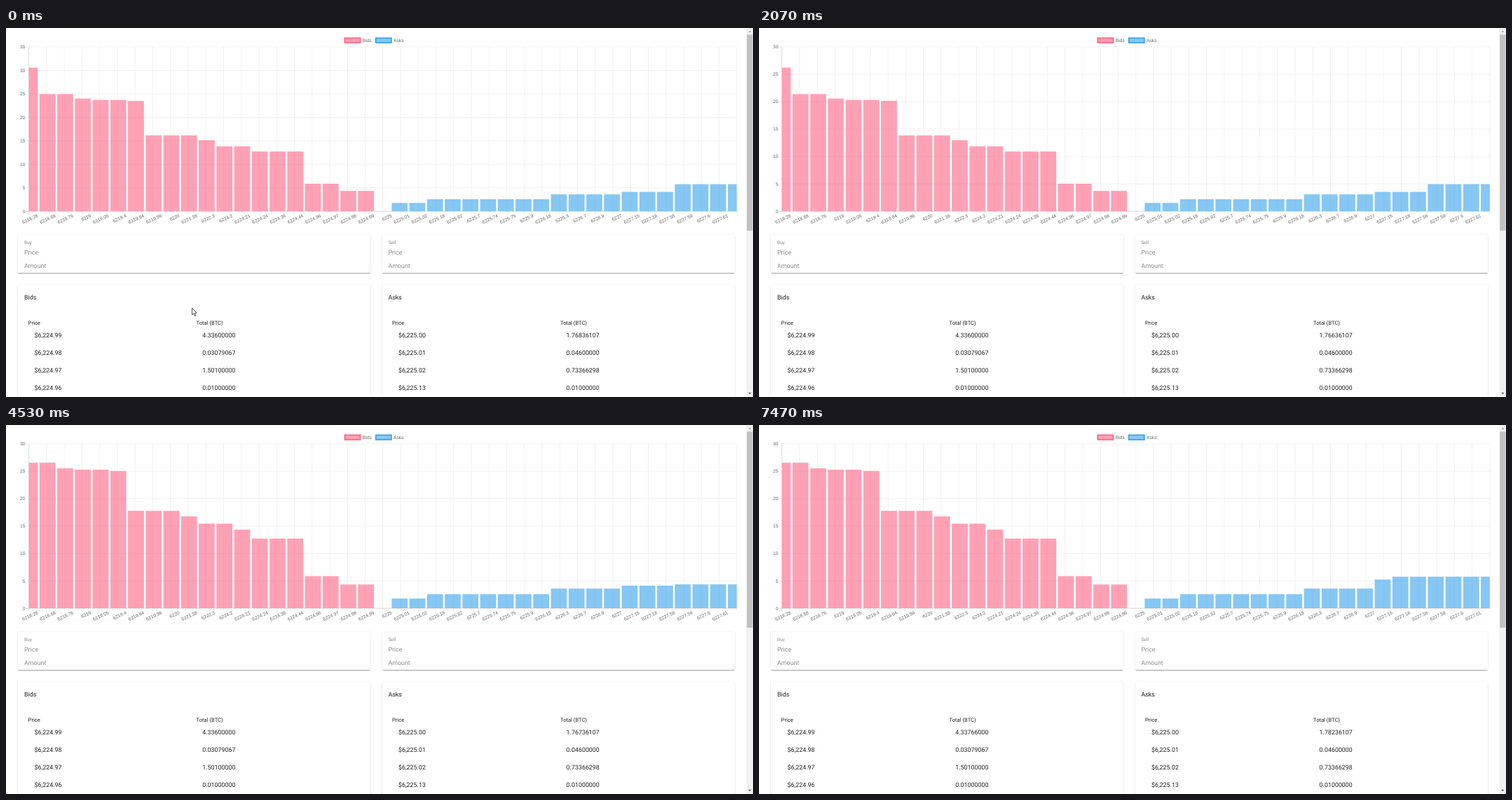
An HTML page with a canvas for the animation above (8000 ms loop, 1066x526 px).

```html
<!DOCTYPE html>
<html lang="en">
<head>
<meta charset="utf-8">
<title>Order book</title>
<style>
  html, body { margin: 0; width: 100%; height: 100%; overflow: hidden; background: #fff; }
  canvas { position: absolute; left: 0; top: 0; }
  .card {
    position: absolute; width: 503px; border-radius: 1px; background: #fff;
    box-shadow: 0 1.7px .6px -1.1px rgba(0,0,0,.2), 0 1.1px 1.1px rgba(0,0,0,.14), 0 .6px 2.8px rgba(0,0,0,.12);
  }
  .left { left: 17px; }
  .right { left: 536.5px; }
  .form { top: 294.5px; height: 54.5px; }
  .table { top: 365.5px; bottom: 0; }
</style>
</head>
<body>
<div class="card left form"></div>
<div class="card right form"></div>
<div class="card left table"></div>
<div class="card right table"></div>
<canvas id="stage" width="1066" height="526"></canvas>
<script>
const ctx = document.getElementById('stage').getContext('2d');
ctx.textRendering = 'geometricPrecision';

const LOOP = 8000, FPS = 15, DURATION = 1000;
const LEFT = 32.7, RIGHT = 1042.8, TOP = 26.9, BASE = 261.3;
const SLOTS = 20, STEP = (RIGHT - LEFT) / (2 * SLOTS), BAR = STEP * 0.9;
const CHART_FONT = '6.67px "Liberation Sans", Arial, sans-serif';
const INK = 'rgba(0,0,0,.87)', MUTED = 'rgba(0,0,0,.45)';
const PINK = [255, 99, 132], BLUE = [54, 162, 235];

// A label that begins with a point shares the whole part of the one before it.
let whole = '';
const labels = ('6218.28 .68 .76 6219 .05 .4 .94 .99 6220 6221.38 6222.3 6224.2 .21 .24 .39 .44 .96 .97 .98 .99 ' +
  '6225 .01 .02 .18 .62 .7 .74 .75 .9 6226.18 .3 .7 .9 6227 .15 .18 .58 .59 .6 .61').split(' ').map(label => {
  if (label[0] === '.') return whole + label;
  whole = label.split('.')[0];
  return label;
});

// Market depth as a staircase of [slot from the spread, total].
const depth = (...steps) => Array.from({ length: SLOTS }, (_, slot) => steps.findLast(([from]) => from <= slot)[1]);
const bids = (...far) => depth([0, 4.35], [2, 5.87], [4, 12.73], ...far);
const asks = (...far) => depth([0, 1.79], [2, 2.57], [9, 3.6], ...far);

const bidsBefore = bids([7, 13.84], [9, 15.13], [10, 16.15], [13, 23.5], [14, 23.7], [16, 24], [17, 24.95], [19, 30.58]);
const bidsAfter = bids([7, 14.35], [8, 15.45], [10, 16.77], [11, 17.79], [14, 25.05], [15, 25.3], [17, 25.55], [18, 26.57]);
const asksHigh = asks([13, 4.14], [16, 5.77]);
const asksLow = asks([13, 4.14], [16, 4.16]);
const asksWide = asks([13, 5.24], [14, 5.77]);

// Each update eases the bar heights from the previous one; the scale changes at once.
const updates = [
  { at: -2000, max: 35, bids: bidsBefore, asks: asksHigh },
  { at: 130, max: 35, bids: bidsBefore, asks: asksLow },
  { at: 1150, max: 35, bids: bidsBefore, asks: asksHigh },
  { at: 2149, scaleAt: 2060, max: 30, bids: bidsAfter, asks: asksHigh },
  { at: 4136, max: 30, bids: bidsAfter, asks: asksLow },
  { at: 5180, max: 30, bids: bidsAfter, asks: asksWide },
];
const bidTotals = [[0, '4.33600000'], [5190, '4.33700000'], [6190, '4.33600000'], [7190, '4.33766000']];
const askTotals = [[0, '1.76836107'], [1190, '1.76736107'], [2060, '1.76636107'], [3190, '1.76736107'], [6190, '1.78236107']];

const rgba = (color, alpha) => `rgba(${color},${alpha})`;
const easeOut = p => 1 - (1 - p) ** 4;
const clamp = p => Math.min(1, Math.max(0, p));
const current = (list, t) => list.findLast(([at]) => at <= t)[1];

function text(str, x, y, size, color = INK) {
  ctx.font = `${size}px Roboto, sans-serif`;
  ctx.fillStyle = color;
  ctx.fillText(str, x, y);
}

function line(x1, y1, x2, y2, alpha) {
  ctx.strokeStyle = `rgba(0,0,0,${alpha})`;
  ctx.lineWidth = 0.6;
  ctx.beginPath();
  ctx.moveTo(x1, y1);
  ctx.lineTo(x2, y2);
  ctx.stroke();
}

function box(x, y, width, height, fill) {
  ctx.fillStyle = fill;
  ctx.fillRect(x, y, width, height);
}

function shape(points, fill) {
  ctx.beginPath();
  points.forEach(([x, y]) => ctx.lineTo(x, y));
  ctx.closePath();
  ctx.fillStyle = fill;
  ctx.fill();
}

function legend(label, x, color) {
  box(x, 14.3, 22.2, 6.67, rgba(color, 0.6));
  ctx.strokeStyle = rgba(color, 1);
  ctx.lineWidth = 1.67;
  ctx.strokeRect(x, 14.3, 22.2, 6.67);
  ctx.font = CHART_FONT;
  ctx.fillStyle = '#666';
  ctx.fillText(label, x + 25.4, 19.9);
}

function axes(max) {
  ctx.save();
  ctx.font = CHART_FONT;
  ctx.fillStyle = '#666';
  ctx.textAlign = 'right';
  for (let value = 0; value <= max; value += 5) {
    const y = BASE - (BASE - TOP) * value / max;
    line(LEFT - 5.5, y, RIGHT, y, value ? 0.1 : 0.25);
    ctx.fillText(value, 27.4, y + 2.3);
  }
  for (let i = 0; i <= labels.length; i++) {
    const x = LEFT + i * STEP;
    line(x, TOP, x, BASE + 5.5, i ? 0.1 : 0.25);
  }
  ctx.textBaseline = 'middle';
  labels.forEach((label, i) => {
    ctx.save();
    ctx.translate(LEFT + (i + 0.5) * STEP, 267.4);
    ctx.rotate(-25 * Math.PI / 180);
    ctx.fillText(label, 0, 0);
    ctx.restore();
  });
  ctx.restore();
}

function bars(t) {
  const index = updates.findLastIndex(u => u.at <= t);
  const to = updates[index], from = updates[Math.max(0, index - 1)];
  const p = easeOut(clamp((t - to.at) / DURATION));
  const draw = (side, color, slotX) => to[side].forEach((total, slot) => {
    const start = from[side][slot] / from.max, end = total / to.max;
    const height = (start + (end - start) * p) * (BASE - TOP);
    box(slotX(slot), BASE - height, BAR, height, rgba(color, 0.6));
  });
  ctx.save();
  ctx.beginPath();
  ctx.rect(LEFT, TOP, RIGHT - LEFT, BASE - TOP);
  ctx.clip();
  draw('bids', PINK, slot => LEFT + (SLOTS - 0.5 - slot) * STEP - BAR);
  draw('asks', BLUE, slot => LEFT + (SLOTS + 0.5 + slot) * STEP);
  ctx.restore();
}

function panel(x, form, title, rows) {
  text(form, x, 308.2, 6.67, MUTED);
  text('Price', x, 322.9, 8.89, MUTED);
  text('Amount', x, 342.2, 8.89, MUTED);
  text(title, x, 386.7, 8.89);
  text('Price', x + 5.6, 422.7, 7.6);
  text('Total (BTC)', x + 245.6, 422.7, 7.6);
  rows.forEach(([price, total], i) => {
    const y = 441 + i * 25;
    text(price, x + 14.5, y, 8.89);
    text(total, x + 254.2, y, 8.89);
  });
}

function scrollbar() {
  box(1056.6, 0, 9.4, 526, '#f1f1f1');
  box(1057.2, 9.4, 8.2, 279.5, '#c1c1c1');
  shape([[1059.3, 6], [1061.4, 3.8], [1063.5, 6]], '#a3a3a3');
  shape([[1059.3, 519.8], [1061.4, 522], [1063.5, 519.8]], '#505050');
}

function cursor(t) {
  const p = clamp((t - 10) / 390);
  if (p === 1) return;
  ctx.save();
  ctx.translate(265.6 - 213 * p, 399.4 + 126 * p);
  shape([[0, 0], [0, 9.4], [2.1, 7.5], [3.7, 11], [5.2, 10.3], [3.7, 7], [6.5, 6.7]], '#fff');
  ctx.strokeStyle = '#000';
  ctx.lineWidth = 0.7;
  ctx.stroke();
  ctx.restore();
}

function draw(now) {
  const t = Math.floor((now % LOOP) * FPS / 1000 + 0.1) * 1000 / FPS;
  ctx.clearRect(0, 0, 1066, 526);
  axes(updates.findLast(u => (u.scaleAt ?? u.at) <= t).max);
  bars(t);
  legend('Bids', 483.4, PINK);
  legend('Asks', 527.7, BLUE);
  panel(26, 'Buy', 'Bids', [
    ['$6,224.99', current(bidTotals, t)], ['$6,224.98', '0.03079067'],
    ['$6,224.97', '1.50100000'], ['$6,224.96', '0.01000000']]);
  panel(545.4, 'Sell', 'Asks', [
    ['$6,225.00', current(askTotals, t)], ['$6,225.01', '0.04600000'],
    ['$6,225.02', '0.73366298'], ['$6,225.13', '0.01000000']]);
  scrollbar();
  cursor(t);
  requestAnimationFrame(draw);
}
requestAnimationFrame(draw);
</script>
</body>
</html>
```
